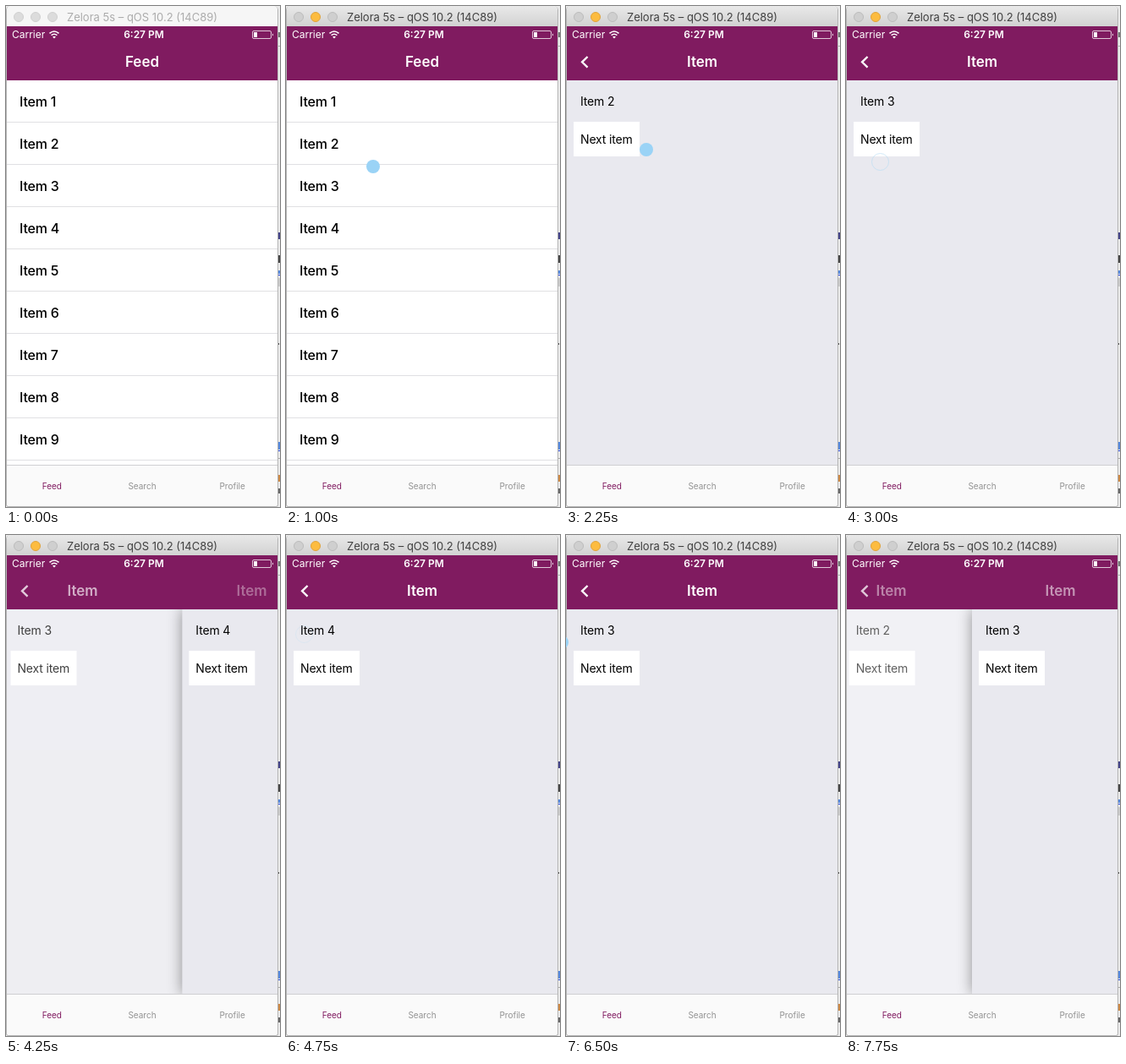
These frames come from a looping animation (324 px wide and 593 px high, 8 s). An HTML page:

```html
<!DOCTYPE html>
<html lang="en">
<head>
<meta charset="utf-8">
<style>
  html, body { margin: 0; width: 100%; height: 100%; overflow: hidden; }
  body { position: relative; background: #ececec; font: 14px Inter, sans-serif; color: #000; }
  div, svg, .abs { position: absolute; box-sizing: border-box; white-space: nowrap; }
  #window { left: 1px; top: 0; width: 320px; height: 592px; overflow: hidden; background: #fff; border-radius: 5px 5px 3px 3px; }
  #frame { left: 0; top: 0; width: 322px; height: 593px; border: 1px solid #b4b4b4; border-top-color: #d4d4d4; border-radius: 5px 5px 3px 3px; }
  #bar { width: 320px; height: 24px; background: linear-gradient(#e9e9e9, #d2d2d2); color: #404040;
         font-size: 13px; line-height: 27px; text-align: center; }
  #bar i { position: absolute; top: 7px; width: 12px; height: 12px; box-sizing: border-box; border-radius: 50%;
           background: #cfcfcf; border: 1px solid #bcbcbc; }
  #bar .amber { background: #fcbc40; border-color: #e0a33a; }
  #bar.idle { background: #f6f6f6; color: #acacac; }
  #bar.idle i { background: #dcdcdc; border-color: #d0d0d0; }
  #header { top: 24px; width: 320px; height: 64px; background: #801b60; color: #fff; overflow: hidden; font-size: 12px; line-height: 20px; }
  .title { top: 22px; width: 320px; line-height: 41px; text-align: center; font-size: 17px; font-weight: 600; }
  #cards { top: 88px; width: 320px; height: 455px; overflow: hidden; }
  .card { width: 320px; height: 455px; background: #e9e9ef; box-shadow: 0 0 16px rgba(0, 0, 0, .4); letter-spacing: -.012em; }
  .list { background: #fff; font-size: 16px; font-weight: 500; }
  .row { width: 320px; height: 50px; padding-left: 15px; line-height: 50px; border-bottom: 1px solid #e0e0e3; }
  .label { left: 16px; top: 0; line-height: 49px; }
  .button { left: 8px; top: 49px; height: 41px; padding: 0 8px; line-height: 41px; background: #fff; }
  #tabs { top: 543px; width: 320px; height: 49px; background: #fafafa; border-top: 1px solid #cfcfd2;
          font-size: 10px; line-height: 49px; text-align: center; color: #929292; }
  #tabs div { width: 106.67px; }
  #touch { width: 16px; height: 16px; margin: -8px; border-radius: 50%; background: #9ad3f6; }
  #touch.ring { width: 21px; height: 21px; margin: -10.5px; background: none; border: 1.5px solid #b5dcf4; }
</style>
</head>
<body>
<svg id="behind" width="324" height="593"></svg>
<div id="frame"></div>
<div id="window">
  <div id="bar"><i style="left:8px"></i><i class="amber" style="left:28px"></i><i style="left:48px"></i>Zelora 5s – qOS 10.2 (14C89)</div>
  <div id="header">
    <div style="left:6px">Carrier</div>
    <div style="width:324px;text-align:center;font-weight:600">6:27 PM</div>
    <svg width="320" height="64" fill="none" stroke="#fff">
      <path d="M50.5 8.4Q56 3.6 61.5 8.4M52.6 10.7Q56 7.8 59.4 10.7" stroke-width="1.6"/>
      <path d="M56 14.5l-1.9-2.1q1.9-1.5 3.8 0z" fill="#fff" stroke="none"/>
      <rect x="290.5" y="5.5" width="22" height="9" rx="1.5" stroke-opacity=".75"/>
      <path d="M292 7h4v6h-4zM314 8.5q2 1.5 0 3z" fill="#fff" stroke="none"/>
    </svg>
  </div>
  <div id="cards"></div>
  <div id="tabs"><div style="left:0;color:#801b60">Feed</div><div style="left:106.67px">Search</div><div style="left:213.33px">Profile</div></div>
</div>
<div id="touch"></div>
<script>
const $ = id => document.getElementById(id);
const add = (parent, className, html) => {
  const el = document.createElement('div');
  el.className = className;
  el.innerHTML = html;
  return parent.appendChild(el);
};

// Slivers of the page behind the window: [x, y, width, height, colour]
$('behind').innerHTML = [
  [0, 47, 1, 1, '#aaa'], [321, 47, 3, 1, '#aaa'], [322, 31, 2, 6, '#777'],
  [0, 267, 1, 3, '#33a'], [0, 295, 1, 9, '#33a'], [0, 312, 1, 7, '#36d'], [0, 350, 1, 9, '#33a'],
  [0, 380, 1, 10, '#33a'], [0, 488, 1, 7, '#36d'], [0, 530, 1, 12, '#33a'],
  [322, 268, 2, 8, '#448'], [322, 295, 2, 9, '#444'], [321, 318, 3, 1, '#24d'], [322, 313, 2, 4, '#58d'],
  [321, 322, 3, 10, '#ccc'], [322, 399, 1, 2, '#555'], [321, 516, 3, 9, '#58d'], [321, 526, 3, 1, '#24d'],
  [321, 535, 3, 1, '#aaa'], [322, 555, 2, 8, '#c84'], [322, 571, 2, 6, '#666']
].map(([x, y, w, h, c]) => `<rect x="${x}" y="${y}" width="${w}" height="${h}" fill="${c}"/>`).join('');

const rows = Array.from({length: 10}, (_, i) => `<div class="row" style="top:${i * 50}px">Item ${i + 1}</div>`).join('');
const chevron = '<svg width="40" height="64" fill="none" stroke="#fff" stroke-width="2.3"><path d="M24.5 36l-6.5 6.3 6.5 6.3"/></svg>';
const screens = [0, 2, 3, 4].map(n => ({
  card: add($('cards'), n ? 'card' : 'card list',
    n ? `<div class="label">Item ${n}</div><div class="button">Next item</div>` : rows),
  title: add($('header'), 'title', n ? 'Item' : 'Feed'),
  back: add($('header'), 'back', n ? chevron : '')
}));

const smooth = (t, start, length) => {
  const u = Math.min(1, Math.max(0, (t - start) / length));
  return u * u * (3 - 2 * u);
};
// Navigation depth: three pushes, then two swipes back
const depthAt = t => smooth(t, 1000, 517) + smooth(t, 2300, 500) + smooth(t, 4050, 500)
  - smooth(t, 5600, 650) - smooth(t, 6600, 2421);

// [press, release, x, y, ring opacity, follows the card]
const touches = [
  [1000, 1250, 103, 190, .8], [2250, 2500, 95, 170, .8], [2750, 3000, 40, 184, .6], [3500, 4000, 42, 164, .6],
  [4500, 4750, 21, 117, .25], [5500, 6000, -5, 127, 0, true], [6500, 7500, -5, 127, 0, true]
];

function draw(t) {
  const depth = depthAt(t);
  $('bar').className = t < 250 ? 'idle' : '';
  screens.forEach(({card, title, back}, i) => {
    const pos = depth - i, near = Math.max(0, 1 - Math.abs(pos));
    card.style.visibility = near ? 'visible' : 'hidden';
    card.style.transform = `translateX(${pos < 0 ? -320 * pos : -10 * pos}px)`;
    card.style.opacity = pos > 0 ? Math.max(0, 1 - .7 * pos) : 1;
    title.style.transform = `translateX(${-200 * pos}px)`;
    title.style.opacity = back.style.opacity = near;
  });

  const touch = touches.find(([press, release]) => t >= press && t < release + 250);
  $('touch').hidden = !touch;
  $('touch').style.display = touch ? '' : 'none';
  if (!touch) return;
  const [, release, x, y, ringOpacity, drags] = touch;
  const released = t >= release;
  $('touch').className = released ? 'ring' : '';
  $('touch').style.opacity = released ? ringOpacity : 1;
  $('touch').style.left = x + (drags ? 320 * (Math.ceil(depth) - depth) : 0) + 'px';
  $('touch').style.top = y + 'px';
}

// The picture advances in quarter-second steps
const origin = performance.now();
(function tick() {
  const t = (performance.now() - origin) % 8000;
  draw(Math.floor(t / 250) * 250);
  requestAnimationFrame(tick);
})();
</script>
</body>
</html>
```
